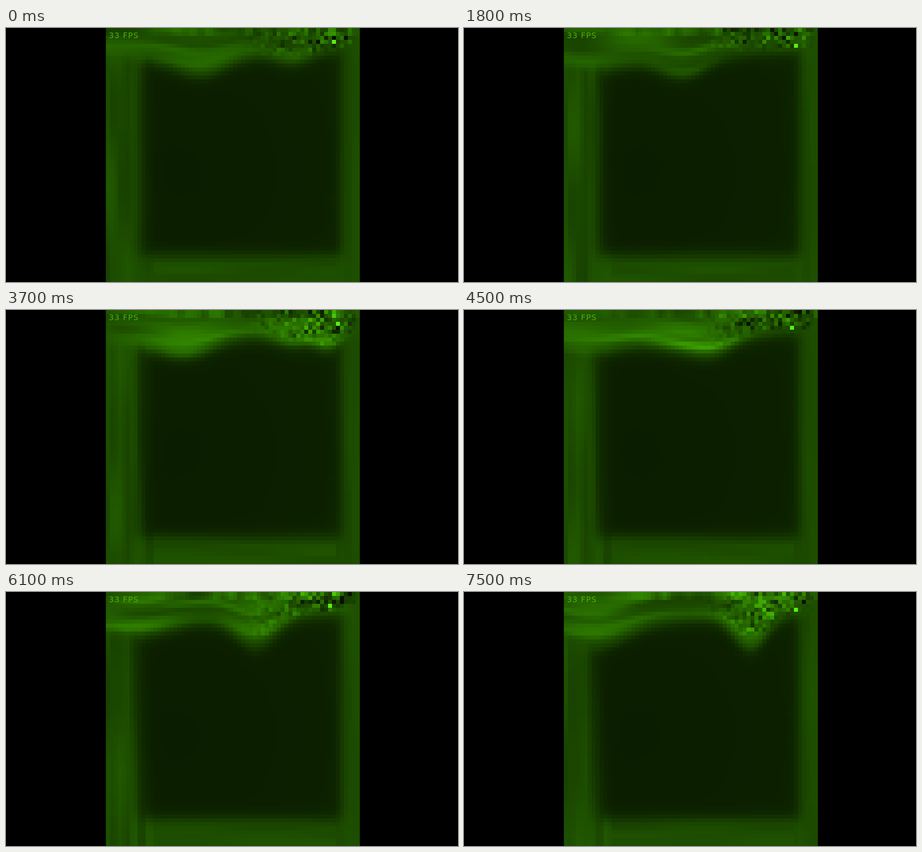
Write an HTML page with a canvas that moves like this. It is 800 by 450 pixels and loops after 7.6 s.

```html
<!DOCTYPE html>
<html lang="en">
<head>
<meta charset="utf-8">
<title>Green fluid</title>
<style>
html, body { margin: 0; width: 100%; height: 100%; overflow: hidden; background: #000; }
#stage { position: relative; width: 800px; height: 450px; overflow: hidden; background: #000; }
canvas { position: absolute; left: 176px; top: 0; width: 450px; height: 450px;
  transform: translateX(.5px); image-rendering: pixelated; }
#rate { position: absolute; left: 182px; top: 5px; font: 14px/16px "DejaVu Sans", sans-serif;
  letter-spacing: .9px; white-space: pre; color: #4cb010; }
</style>
</head>
<body>
<div id="stage"><canvas id="fluid" width="64" height="64"></canvas><div id="rate">33 FPS</div></div>
<script>
const N = 64, LOOP = 7600, STEP = 100;
const SPEED = 23; // cells per second, leftward along the top
const ctx = document.getElementById('fluid').getContext('2d');
const image = ctx.createImageData(N, N);

// Waves of dye drifting left; pass is the second at which one crosses column 47.
const plumes = [
  { pass: -1, depth: 4.5, glow: 20 },
  { pass: 0, depth: 2.5, glow: 18 },
  { pass: 1.06, depth: 5, glow: 12 },
  { pass: 2.55, depth: 4, glow: 48 },
  { pass: 3.7, depth: 2.5, glow: 42 },
  { pass: 4.1, depth: 4, glow: 26 },
  { pass: 5.7, depth: 7, glow: 20 },
  { pass: 7.5, depth: 8, glow: 34 }
];

const clamp = (v, a = 0, b = 1) => Math.max(a, Math.min(b, v));
const mix = (a, b, k) => a + (b - a) * k;
const rise = v => 1 / (1 + Math.exp(-v));
const bell = v => Math.exp(-v * v);
const ease = k => k * k * (3 - 2 * k);

function hash(x, y, z = 0) {
  let h = Math.imul(x, 374761393) ^ Math.imul(y, 668265263) ^ Math.imul(z, 1274126177);
  h = Math.imul(h ^ h >>> 13, 1103515245);
  return ((h ^ h >>> 16) >>> 0) / 4294967296;
}

// smooth noise from -1 to 1
function drift(x, y, seed) {
  const i = Math.floor(x), j = Math.floor(y), u = ease(x - i), v = ease(y - j);
  const row = n => mix(hash(i, n, seed), hash(i + 1, n, seed), u);
  return 2 * mix(row(j), row(j + 1), v) - 1;
}

// lower rim of the top band and the dye's light in one column
function column(x, t) {
  let rim = 9 - 3 * x / N, glow = 0;
  for (const p of plumes) {
    const raw = 47 - SPEED * (t - p.pass);
    const at = Math.max(8, raw);
    const life = rise((61 - raw) / 1.2) * Math.exp(Math.min(0, raw - 8) / 12);
    const width = 4.5 + 0.13 * (58 - at);
    rim += life * p.depth * bell((x - at) / width);
    glow += life * p.glow * bell((x - at) / (1.4 * width));
  }
  return { rim, glow };
}

function setCell(x, y, v) {
  const i = (y * N + x) * 4;
  image.data[i] = v * 0.37;
  image.data[i + 1] = v;
  image.data[i + 2] = Math.max(0, v - 190) * 0.45;
  image.data[i + 3] = 255;
}

function level(x, y, t, step, { rim, glow }) {
  const left = 8.7 - 3 * clamp((t - 3.5) / 4) * clamp(1 - y / 56);
  const inside = rise((y - rim) / 0.9) * rise((x - left) / 1.1)
    * rise((59.4 - x) / 0.8) * rise((57.2 - y) / 0.95);
  const cover = 1 - inside;
  const upper = clamp((rim + 1 - y) / 4) * clamp((62 - x) / 4);
  const flow = x + SPEED * t;

  // streaks lie along the current: across the top, down the sides, along the floor
  const topStreak = drift(flow / 15, (y - 0.5 * rim) / 1.7, 1) * (17 + 0.35 * glow);
  const sideStreak = x < 12 || x > 58
    ? drift(x / 1.8, (y - 14 * t) / 20, 2) * (x < 12 ? 13 : 5)
    : drift((x - 10 * t) / 20, y / 1.7, 3) * 6;

  const dye = 77 + 5 * upper + mix(sideStreak, topStreak, upper);
  let v = mix(29 + Math.hypot(x - 18, y - 36) / 12, dye, cover);
  v += glow * (0.45 * upper * cover + 0.5 * bell((y - 0.75 * rim) / 1.9));

  // turbulence near the inlet, and upright bars along the top wall
  const rough = ease(clamp((x - 32) / 24)) * clamp((63 - x) / 2) * clamp((0.9 * rim - y) / 3);
  const grain = 2 * hash(Math.floor(x) + step, Math.floor(y), step >> 2) - 1;
  v += rough * (75 * grain ** 3 + 14 * grain);
  if (y < 2) v += clamp((x - 8) / 10) * (10 + drift(flow / 2, 0, 4) * (14 + 0.35 * x));
  return clamp(v, 16, 255);
}

function draw(step) {
  const t = step * STEP / 1000;
  for (let x = 0; x < N; x++) {
    const col = column(x + 0.5, t);
    for (let y = 0; y < N; y++) setCell(x, y, level(x + 0.5, y + 0.5, t, step, col));
  }
  // the bright inlet jitters in place
  setCell(55 + Math.floor(4 * hash(step, 5)), 3 + Math.floor(2 * hash(step, 6)), 240);
  ctx.putImageData(image, 0, 0);
}

const start = performance.now();
let last = -1;
function tick() {
  const step = Math.floor((performance.now() - start) % LOOP / STEP);
  if (step !== last) draw(last = step);
  requestAnimationFrame(tick);
}
tick();
</script>
</body>
</html>
```
